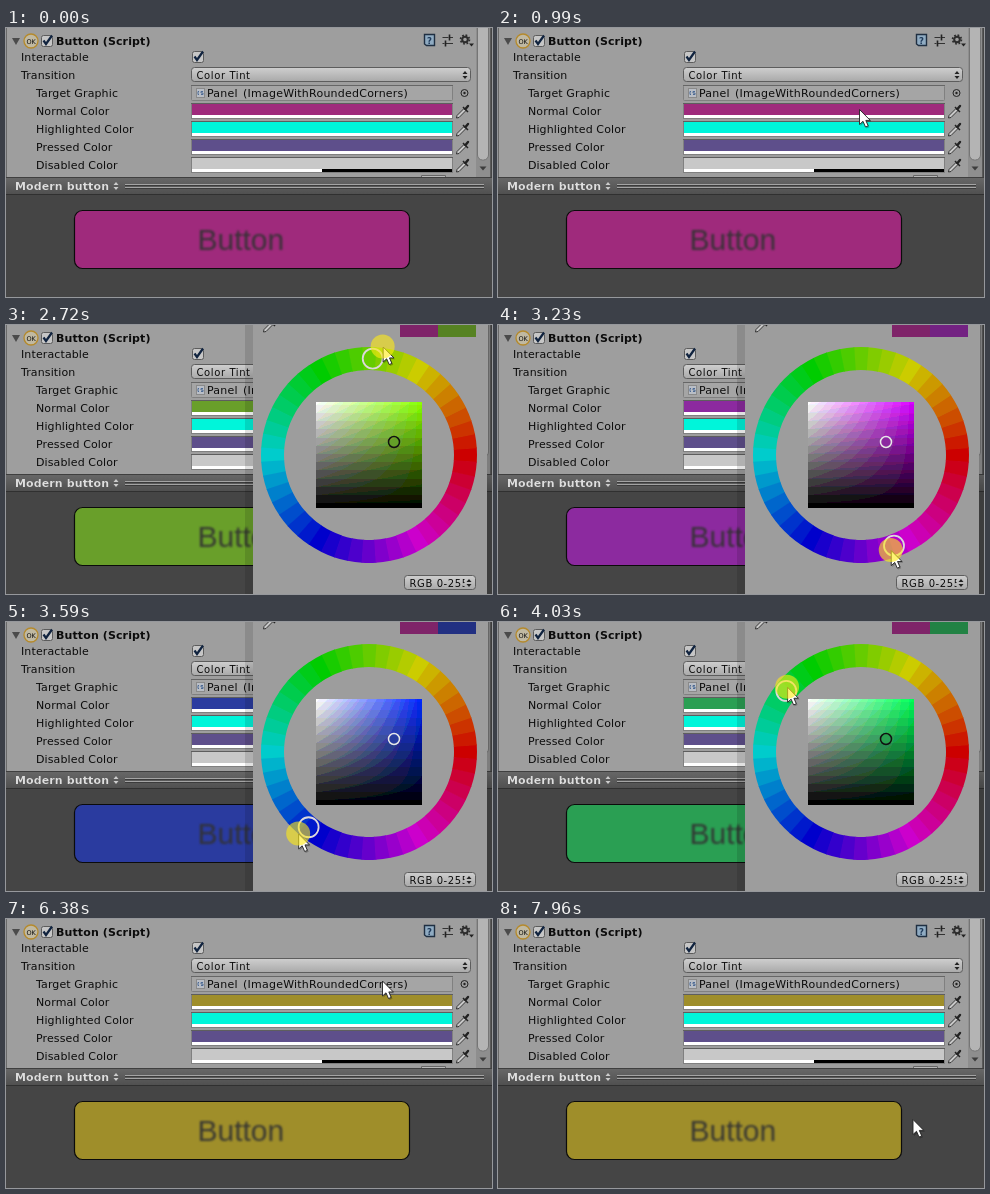
These frames come from a looping animation (486 px wide and 269 px high, 7990 ms). An HTML page with a canvas:

```html
<!DOCTYPE html>
<html lang="en">
<head>
<meta charset="utf-8">
<title>Button colour picker</title>
<style>
  html, body { margin: 0; width: 100%; height: 100%; overflow: hidden; background: #454545; }
  #stage { position: absolute; left: 0; top: 0; width: 486px; height: 269px; overflow: hidden; }
  svg, canvas { position: absolute; left: 0; top: 0; display: block; }
  #shade { left: 310px; top: 77px; }
  text { font: 11px "DejaVu Sans", sans-serif; fill: #0c0c0c; letter-spacing: .12px; white-space: pre; }
  .bold { font-weight: bold; }
  .wide { letter-spacing: .23px; word-spacing: 1.5px; }
  .small { font-size: 10px; letter-spacing: .6px; }
  .caption { font: 30px "Liberation Sans", Arial, sans-serif; fill: #323232; letter-spacing: 0; opacity: .92; filter: blur(.9px); }
</style>
</head>
<body>
<div id="stage">
  <svg width="486" height="269">
    <defs>
      <linearGradient id="pop" x2="0" y2="1"><stop stop-color="#cfcfcf"/><stop offset="1" stop-color="#a9a9a9"/></linearGradient>
      <linearGradient id="bar" x2="0" y2="1"><stop stop-color="#686868"/><stop offset="1" stop-color="#505050"/></linearGradient>
      <g id="dropper">
        <path d="M-6.500 7L-6 4.500 1-2.500 3-.5-4 6.500Z" fill="#c8c8c8" stroke="#2a2a2a" stroke-width=".9"/>
        <path d="M0-4L5 1" stroke="#222" stroke-width="1.500"/>
        <path d="M2.500-2L5-5" stroke="#222" stroke-width="2.400" stroke-linecap="round"/>
      </g>
      <path id="updown" d="M-2.5-1L0-4 2.5-1ZM-2.5 1L0 4 2.5 1Z"/>
      <g id="check">
        <rect x="-5.5" y="-5.5" width="11" height="11" rx="2" fill="#c6c6c6" stroke="#5c5c5c"/>
        <path d="M-3.5-.5L-1 3 5-5.5" fill="none" stroke="#10233f" stroke-width="2.2"/>
      </g>
    </defs>
    <rect width="485" height="150" fill="#9e9e9e"/>
    <path d="M.5 0V166" stroke="#6a6a6a"/>
    <path d="M6 10h8l-4 7Z" fill="#4b4b4b"/>
    <circle cx="25" cy="13" r="7" fill="#c0b9a2" stroke="#b58a2c" stroke-width="1.3"/>
    <text x="20.5" y="15.5" style="font-size:6.5px;letter-spacing:0">OK</text>
    <use href="#check" x="41" y="13"/>
    <text class="bold" x="50" y="17">Button (Script)</text>
    <path d="M418.500 6.500h10v11h-8l-2-1.500Z" fill="#8fabc2" stroke="#1f2f42" stroke-width="1.400"/>
    <text class="bold" x="421" y="15.500" style="font-size:8.500px;fill:#1f3a5a">?</text>
    <path d="M436.500 9.500h6M444 9.500h3M436.500 15.500h2M440 15.500h7" stroke="#333"/>
    <path d="M443.500 6.500v6M439.500 12.500v6" stroke="#222" stroke-width="1.600"/>
    <circle cx="459" cy="11.500" r="2.800" fill="none" stroke="#2d2d2d" stroke-width="2"/>
    <circle cx="459" cy="11.500" r="4.400" fill="none" stroke="#2d2d2d" stroke-width="1.800" stroke-dasharray="1.730"/>
    <path d="M463 15.500h5l-2.500 3Z" fill="#222"/>

    <text x="15" y="33">Interactable</text>
    <use href="#check" x="192" y="29"/>
    <text x="15" y="51">Transition</text>
    <rect x="185.500" y="39.500" width="279" height="14" rx="3" fill="url(#pop)" stroke="#5d5d5d"/>
    <text class="small" x="190.500" y="50.500">Color Tint</text>
    <use href="#updown" x="459" y="47" fill="#222"/>
    <text x="30" y="69">Target Graphic</text>
    <rect x="185.500" y="57.500" width="261" height="15" rx="1" fill="#a5a5a5" stroke="#808080"/>
    <path d="M185 57.500h262" stroke="#666"/>
    <rect x="190.500" y="60.500" width="8" height="9" fill="#b9bec6" stroke="#8a8a8a"/>
    <path d="M193 63.500h-1v3h1M197 63.500h-2v1.500h2v1.500h-2" fill="none" stroke="#4d6a94"/>
    <text class="wide" x="201" y="69">Panel (ImageWithRoundedCorners)</text>
    <circle cx="458.500" cy="65" r="3.500" fill="none" stroke="#222"/>
    <circle cx="458.500" cy="65" r="1.200" fill="#222"/>
    <g id="rows"></g>
    <path d="M415.500 150v-2.500h24v2.500" fill="#b8b8b8" stroke="#666"/>

    <rect x="470" width="14" height="149" fill="#8e8e8e"/>
    <rect x="471.500" y="-8" width="11" height="140" rx="5" fill="#b4b4b4" stroke="#757575"/>
    <path d="M473.500 138.500h7l-3.500 4Z" fill="#3d3d3d"/>
    <path d="M484.500 0V149" stroke="#5a5a5a"/>

    <rect y="149" width="486" height="17" fill="url(#bar)"/>
    <path d="M0 149.500H486" stroke="#3f3f3f"/>
    <path d="M0 166.500H486" stroke="#303030"/>
    <text class="bold" x="9" y="162" style="fill:#222">Modern button</text>
    <text class="bold" x="9" y="161.500" style="fill:#dedede">Modern button</text>
    <use href="#updown" x="110" y="158" fill="#ccc"/>
    <path d="M119 156.500H478M119 159.500H478" stroke="#a4a4a4"/>
    <path d="M119 157.500H478M119 160.500H478" stroke="#3b3b3b"/>
    <rect y="167" width="486" height="102" fill="#454545"/>
    <rect class="tint" x="68.500" y="182.500" width="335" height="58" rx="8" stroke="#0b0b0b" stroke-width="1.200"/>
    <text class="caption" x="191.500" y="222">Button</text>
  </svg>

  <div id="picker">
    <svg width="486" height="269">
      <rect x="239" width="247" height="269" opacity=".12"/>
      <rect x="247" width="234" height="269" fill="#9d9d9d"/>
      <use href="#dropper" x="264" y="0"/>
      <rect x="394" y="-2" width="38" height="14" fill="#7f2469"/>
      <rect class="tint" x="432" y="-2" width="38" height="14"/>
      <rect x="432" y="-2" width="38" height="14" opacity=".18"/>
      <g id="ring"></g>
      <rect x="398.500" y="250.500" width="71" height="14" rx="3" fill="url(#pop)" stroke="#5d5d5d"/>
      <clipPath id="clip"><rect x="400" y="250" width="58.500" height="16"/></clipPath>
      <text class="small" x="403.500" y="261.500" clip-path="url(#clip)">RGB 0-255</text>
      <use href="#updown" x="463" y="258" fill="#222"/>
    </svg>
    <canvas id="shade" width="106" height="106"></canvas>
    <svg width="486" height="269" fill="none">
      <circle id="spot" cx="388" cy="117" r="5.500" stroke-width="1.500"/>
      <circle id="mark" r="10" stroke="#dcd8dc" stroke-width="1.800"/>
    </svg>
  </div>

  <svg width="486" height="269">
    <g id="cursor">
      <path d="M1.500 2V17L5 13.800 7.500 19.500 10.500 18.200 8 12.700H12.500Z" opacity=".25"/>
      <path d="M.5.5V15.500L4 12.300 6.500 18 9.200 16.900 6.800 11.400H11.300Z" fill="#fff" stroke="#222" stroke-width=".9"/>
      <circle id="glow" r="12" fill="rgb(255,235,20)" fill-opacity=".6"/>
    </g>
  </svg>
</div>

<script>
const LOOP = 7990, CX = 363, CY = 130, RING = 96.5;
const SAT = 0.736, VAL = 0.624, FIRST_HUE = 318;
const OPEN = 1320, CLOSE = 6380, PRESS = 2030, RELEASE = 5180;
const LAG = 11; // the wheel trails the pointer slightly
const $ = id => document.getElementById(id);
const rad = deg => deg * Math.PI / 180;

// Pointer tip before and after the drag: time, x, y
const approach = [[500, 458, 111], [990, 361, 81], [1550, 361, 81], [1780, 367, 92], [PRESS, 435, 194]];
const leave = [[5410, 435, 41], [5770, 376, 61.5], [6650, 376, 61.5], [7430, 424, 178], [7700, 438, 190], [7960, 414.5, 200]];
// Drag around the wheel: time, unwrapped angle, distance from centre
const drag = [[PRESS, -42, 97], [2340, -105, 113], [2860, -340, 108], [3230, -432.5, 99.6],
  [3450, -462, 111], [4030, -581.3, 98.5], [4790, -655.4, 109.6], [5030, -669, 114.5]];

function at(keys, t) {
  const last = keys[keys.length - 1];
  if (t <= keys[0][0]) return keys[0].slice(1);
  if (t >= last[0]) return last.slice(1);
  const i = keys.findIndex(k => k[0] > t);
  const a = keys[i - 1], b = keys[i], k = (t - a[0]) / (b[0] - a[0]);
  return [a[1] + (b[1] - a[1]) * k, a[2] + (b[2] - a[2]) * k];
}

function polar(deg, r) {
  return [CX + r * Math.cos(rad(deg)), CY - r * Math.sin(rad(deg))];
}

function hsv(h, s, v) {
  return [5, 3, 1].map(n => {
    const k = (n + h / 60) % 6;
    return 255 * v * (1 - s * Math.max(0, Math.min(k, 4 - k, 1)));
  });
}

function buildRows() {
  const rows = [["Normal Color", "", 1], ["Highlighted Color", "#00f5da", 1],
    ["Pressed Color", "#5e4f8b", 1], ["Disabled Color", "#c8c8c8", .5]];
  $("rows").innerHTML = rows.map(([label, fill, alpha], i) => {
    const y = 83 + i * 18;
    return `<text x="30" y="${y + 4}">${label}</text>
      <rect x="185" y="${y - 8}" width="262" height="16" fill="#808080"/>
      <rect x="185" y="${y - 8}" width="262" height="1" fill="#5e5e5e"/>
      <rect class="${fill ? "" : "tint"}" fill="${fill}" x="186" y="${y - 7}" width="260" height="11"/>
      <rect x="186" y="${y + 4}" width="260" height="3"/>
      <rect x="186" y="${y + 4}" width="${Math.round(260 * alpha)}" height="3" fill="#fff"/>
      <use href="#dropper" x="457" y="${y}"/>`;
  }).join("");
}

function buildRing() {
  const step = 7.5;
  let out = "";
  for (let h = 0; h < 360; h += step) {
    const [x1, y1] = polar(h - step / 2 - .2, RING), [x2, y2] = polar(h + step / 2 + .2, RING);
    out += `<path d="M${x1} ${y1}A${RING} ${RING} 0 0 0 ${x2} ${y2}" fill="none" stroke="hsl(${h},100%,40%)" stroke-width="23"/>`;
  }
  $("ring").innerHTML = out;
}

const pen = $("shade").getContext("2d"), image = pen.createImageData(106, 106);
let shownHue = null;

// Saturation across, value down, in coarse tonal bands
function paintShade(hue) {
  const pure = hsv(hue, 1, 1), band = 20;
  for (let y = 0, p = 0; y < 106; y++) {
    const v = 1 - y / 105;
    for (let x = 0; x < 106; x++, p += 4) {
      const s = x / 105;
      for (let c = 0; c < 3; c++) {
        image.data[p + c] = Math.round(v * (255 + (pure[c] - 255) * s) / band) * band;
      }
      image.data[p + 3] = 255;
    }
  }
  pen.putImageData(image, 0, 0);
}

function setHue(hue) {
  if (hue === shownHue) return;
  shownHue = hue;
  const [r, g, b] = hsv(hue, SAT, VAL);
  for (const el of document.querySelectorAll(".tint")) el.style.fill = `rgb(${r},${g},${b})`;
  $("spot").setAttribute("stroke", .3 * r + .59 * g + .11 * b > 100 ? "#111" : "#e8e8e8");
  const [x, y] = polar(hue, RING);
  $("mark").setAttribute("cx", x);
  $("mark").setAttribute("cy", y);
  paintShade(hue);
}

function draw(t) {
  const tip = t < PRESS ? at(approach, t) : t < 5410 ? polar(...at(drag, t)) : at(leave, t);
  setHue(t < PRESS ? FIRST_HUE : (at(drag, t - LAG)[0] + 720) % 360);
  const pressed = (t >= 1270 && t < 1370) || (t >= PRESS && t < RELEASE);
  $("picker").style.display = t >= OPEN && t < CLOSE ? "" : "none";
  $("cursor").style.display = t >= 500 ? "" : "none";
  $("glow").style.display = pressed ? "" : "none";
  $("cursor").setAttribute("transform", `translate(${tip[0]} ${tip[1]})`);
}

const start = performance.now();
function tick() {
  draw((performance.now() - start) % LOOP);
  requestAnimationFrame(tick);
}

buildRows();
buildRing();
tick();
</script>
</body>
</html>
```
